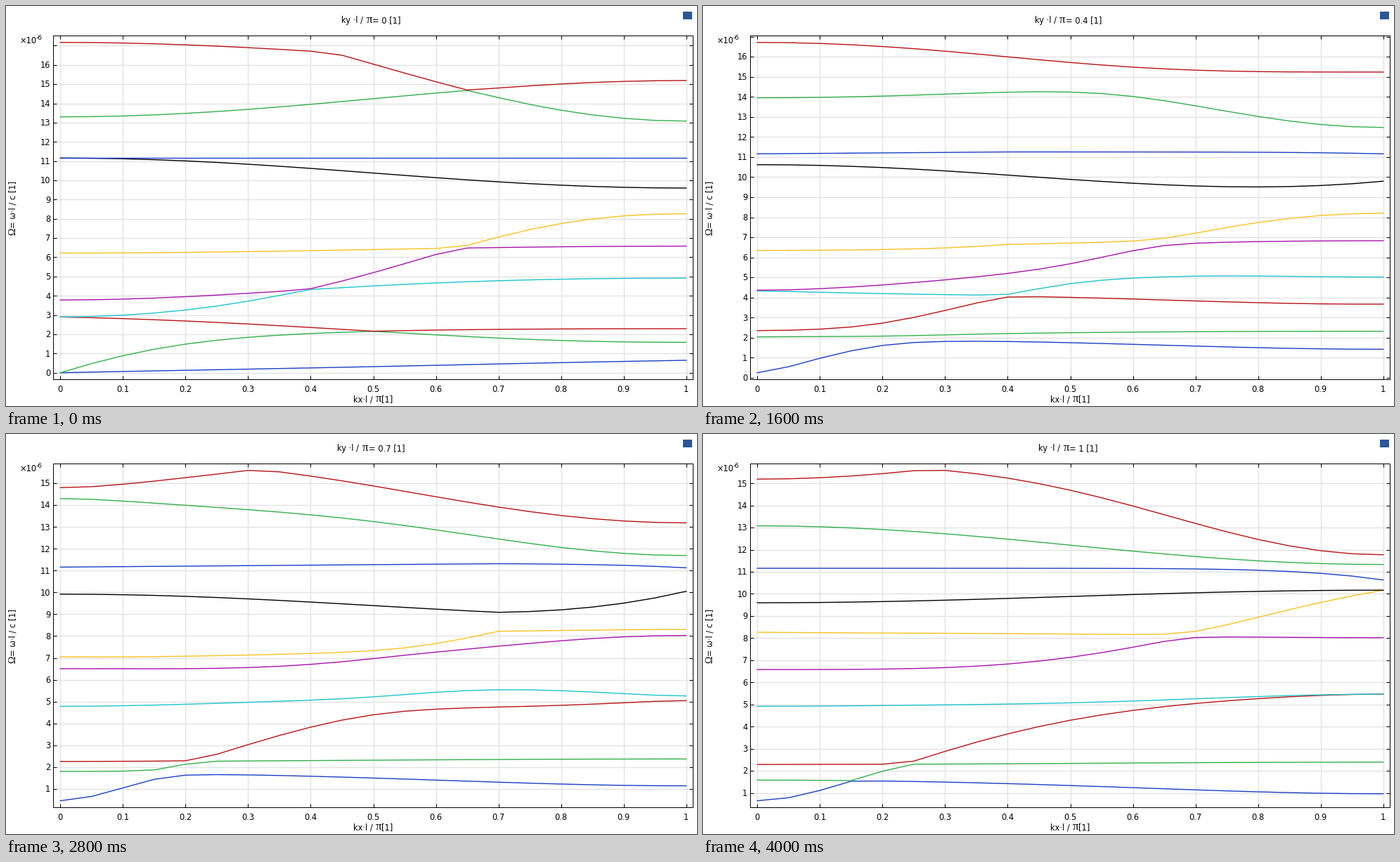
These frames come from a looping animation (983 by 569 pixels, 4200 ms). A matplotlib script:

```python
import numpy as np
import matplotlib.pyplot as plt
from matplotlib.animation import FuncAnimation
from matplotlib.collections import LineCollection
from matplotlib.patches import Rectangle

WIDTH, HEIGHT = 983, 569
LEFT, RIGHT, TOP, BOTTOM = 67, 977, 42, 531.5
MARGIN = 9.8
FONT = 11.5
BLUE, GREEN, RED = "#1a40c4", "#32b04b", "#b81414"
COLORS = [BLUE, GREEN, RED, "#1ec3cd", "#a814ac", "#f8c220", "black",
          BLUE, GREEN, RED]

K = np.linspace(0, 1, 21)
STATES = UX, UY, RX, RY, E, F, P, Q, H, G, T = range(11)


def ease(k):
    return (1 - np.cos(np.pi * k)) / 2


def corners(kx, ky, origin, x_end, y_end, far):
    """Cosine blend of the values at the four corners of the (kx, ky) square."""
    sx, sy = ease(kx), ease(ky)
    return ((1 - sx) * (1 - sy) * origin + sx * (1 - sy) * x_end
            + (1 - sx) * sy * y_end + sx * sy * far)


def polarised(kx, ky):
    """Squared frequencies of a wave and a resonator, and their coupling."""
    resonator = corners(kx, ky, 5.29, 5.5, 2.5, 3.33)
    coupling = 4.06 * (1 - ky) ** .6 * np.cos(np.pi * ky / 2) ** 1.3
    phase = np.pi * kx / 2 + (.255 * ease(ky) - .145) * np.sin(np.pi * kx) ** 2
    stiffness = (65.1 - 35.6 * ease(ky)) * np.sin(phase) ** 2
    wave = coupling ** 2 / resonator + .42 * ky ** 1.8 + stiffness
    return wave, resonator, coupling


def band_surfaces():
    """Ten lowest eigenfrequencies of coupled lattice modes, [band, ky, kx]."""
    kx, ky = np.meshgrid(K, K)
    sx, sy = ease(kx), ease(ky)
    bump_x, bump_y = np.sin(np.pi * kx), np.sin(np.pi * ky)
    low, high = np.minimum(kx, ky), np.maximum(kx, ky)
    m = np.zeros(kx.shape + (len(STATES),) * 2)

    def couple(i, j, value):
        m[..., i, j] = m[..., j, i] = value

    for u, r, a, b in ((UX, RX, kx, ky), (UY, RY, ky, kx)):
        m[..., u, u], m[..., r, r], coupling = polarised(a, b)
        couple(u, r, coupling)
        couple(u, E, 20 * np.sin(np.pi * b) * ease(a) ** 2)
        couple(u, F, 4.5 * np.sin(np.pi * b) * ease(a))
    couple(RX, RY, 2.4 * np.sin(np.pi * kx / 2) * np.sin(np.pi * ky / 2))
    couple(H, G, 30 * bump_x * bump_y)

    m[..., E, E] = (corners(kx, ky, 14.3, 24.2, 24.2, 64.3)
                    + 1.1 * (bump_x ** 2 * (1 - sy) + bump_y ** 2 * (1 - sx)))
    m[..., F, F] = (38.7 + 4.6 * (sx + sy)
                    + 55.5 * ease(low) ** 1.6 * low ** 1.7)
    frequencies = {
        P: 11.16 - 1.56 * (sx + sy) + 2.13 * ease(low) * high ** 4,
        Q: 11.16 + .24 * low * (1 - high ** 8) - .53 * (kx * ky) ** 8,
        H: corners(kx, ky, 19, 13.08, 13.08, 11.33) + .8 * (bump_x * bump_y) ** 2,
        G: corners(kx, ky, 13.3, 15.19, 15.19, 17.8),
        T: corners(kx, ky, 17.17, 15.85, 15.85, 11.77)
           + .88 * (bump_x ** 2 * sy ** 3 + bump_y ** 2 * sx ** 3),
    }
    for state, omega in frequencies.items():
        m[..., state, state] = omega ** 2

    squared = np.linalg.eigvalsh(m)[..., :len(COLORS)]
    return np.moveaxis(np.sqrt(np.clip(squared, 0, None)), -1, 0)


OMEGA = band_surfaces()

plt.rcParams["font.family"] = "DejaVu Sans"
fig = plt.figure(figsize=((WIDTH + .01) / 72, (HEIGHT + .01) / 72), dpi=72,
                 facecolor="white")
ax = fig.add_axes([0, 0, 1, 1])
ax.set(xlim=(0, WIDTH), ylim=(HEIGHT, 0))
ax.axis("off")


def label(x, y, text, size=FONT, **kw):
    return ax.text(x, y, text, fontsize=size, va="baseline",
                   rotation_mode="anchor", **kw)


def greek(x, y, text, size, **kw):
    return label(x, y, text, size, family="Liberation Serif", **kw)


def segments(color, width, zorder, lines=()):
    group = LineCollection(lines, colors=color, linewidths=width, zorder=zorder)
    return ax.add_collection(group, autolim=False)


def x_pixel(k):
    return LEFT + MARGIN + .5 + (RIGHT - LEFT - 2 * MARGIN) * k


# Fixed parts: frame, x axis, captions
ax.add_patch(Rectangle((LEFT, TOP), RIGHT - LEFT, BOTTOM - TOP, fill=False,
                       ec="black", lw=1, zorder=4))
ax.add_patch(Rectangle((963, 8), 12.5, 11, fc="#2b5797", lw=0))
x_ticks = [x_pixel(n / 10) for n in range(11)]
segments("#e2e2e2", 1.4, 1, [[(x, TOP), (x, BOTTOM)] for x in x_ticks])
segments("black", 1, 4, [[(x, y), (x, y + d)] for x in x_ticks
                         for y, d in ((TOP, 5), (BOTTOM, -5))])
for n, x in enumerate(x_ticks):
    label(x, 549, f"{n / 10:g}", ha="center")

label(493.5, 563, "kx·l / ")
greek(525.5, 563, "π", 17)
label(534, 563, "[1]")
greek(13.5, 326, "Ω", 14, rotation=90)
label(13.5, 315.5, "= ω·l / c [1]", rotation=90)
label(19, 53, "×10")
label(43, 47.5, "-6", 9)

# Parts that change with ky
title = [label(0, 24, "ky ·l / "), greek(0, 24, "π", 17), label(0, 24, "")]
y_grid = segments("#e2e2e2", 1.4, 1)
y_marks = segments("black", 1, 4)
y_labels = [label(63.5, 0, str(n), ha="right") for n in range(18)]
curves = [ax.plot([], [], color=c, lw=1.4, zorder=3)[0] for c in COLORS]


def draw(frame):
    omega = OMEGA[:, frame]
    low, high = omega.min(), omega.max()
    scale = (BOTTOM - TOP - 2 * MARGIN) / (high - low)

    def y_pixel(value):
        return BOTTOM - MARGIN - (value - low) * scale

    for curve, values in zip(curves, omega):
        curve.set_data(x_pixel(K), y_pixel(values))

    heights = [y_pixel(n) for n in range(len(y_labels))]
    inside = [y for y in heights if TOP <= y <= BOTTOM + .5]
    y_grid.set_segments([[(LEFT, y), (RIGHT, y)] for y in inside])
    y_marks.set_segments([[(x, y), (x + d, y)] for y in inside
                          for x, d in ((LEFT, 5), (RIGHT, -5))])
    for text, y in zip(y_labels, heights):
        text.set_y(y + 4.3)
        text.set_visible(62 < y <= BOTTOM + .5)  # leave room for the exponent

    tail = title[-1]
    tail.set_text(f"= {round(K[frame], 2):g} [1]")
    start = 519.5 - (44.5 + tail.get_window_extent().width) / 2
    for part, offset in zip(title, (0, 35.5, 44.5)):
        part.set_x(start + offset)
    return [*curves, y_grid, y_marks, *y_labels, *title]


anim = FuncAnimation(fig, draw, frames=len(K), interval=200, repeat=True,
                     repeat_delay=0)
plt.show()
```
